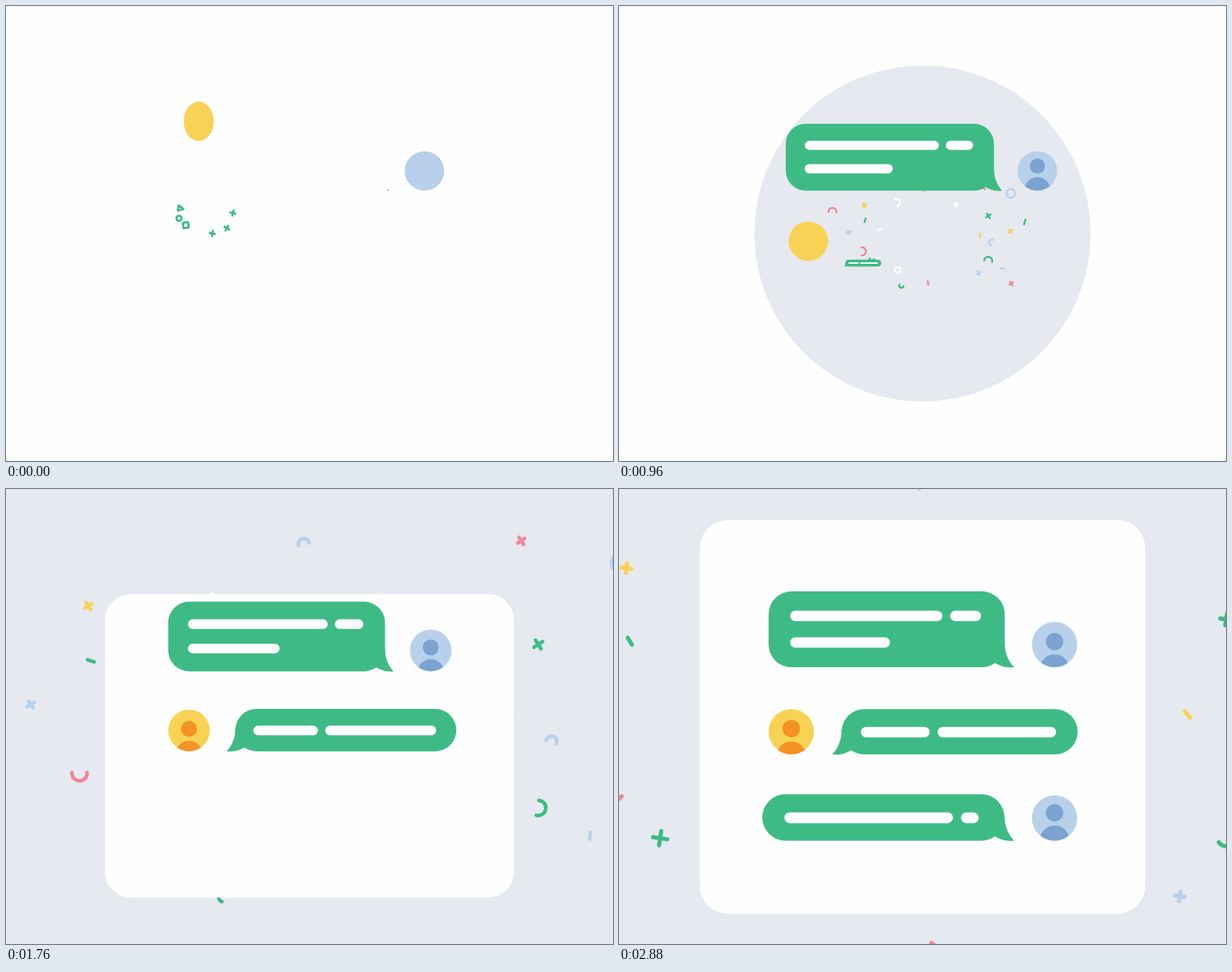
Write an HTML page with a canvas that moves like this. It is 800 by 600 pixels and loops after 2960 ms.

```html
<!DOCTYPE html>
<html lang="en">
<head>
<meta charset="utf-8">
<title>Chat bubbles</title>
<style>
  html, body { margin: 0; width: 100%; height: 100%; overflow: hidden; background: #fefefe; }
  canvas { display: block; width: 100vw; height: 100vh; }
</style>
</head>
<body>
<canvas id="stage" width="800" height="600"></canvas>
<script>
const ctx = document.getElementById('stage').getContext('2d');
const LOOP = 2960, STEP = 80, TAU = Math.PI * 2;
const WHITE = '#fefefe', GREY = '#e6e9f0', GREEN = '#3ebb84', YELLOW = '#f8d254',
      ORANGE = '#f39324', BLUE = '#b9d0eb', NAVY = '#7aa3d0', PINK = '#f2849e';

const clamp = (v, lo = 0, hi = 1) => Math.max(lo, Math.min(hi, v));
const mix = (a, b, u) => a + (b - a) * u;
const rad = deg => deg * Math.PI / 180;
const smooth = u => (1 - Math.cos(Math.PI * clamp(u))) / 2;
const settle = (d, tau) => 1 - Math.exp(-((Math.max(d, 0) / tau) ** 2));

// Quick growth that overshoots by about 5% and slowly sinks back.
const bubbleScale = d => settle(d, 188) * (1 + .053 * clamp(1 - (d - 320) / 880));

// Offset of the head from the middle of its disc: it rises from below, then sinks a little.
const headRise = d => mix(38, -7.2, settle(d, 477)) + 3.7 * smooth((d - 1040) / 860);

// Share of the flight done: a fast launch, then an even slowdown.
const flight = t => 1.11 * (1 - (1 - (t - 641) / 2237) ** 2) * settle(t - 800, 130);

function disc(x, y, r, fill) {
  ctx.beginPath();
  ctx.arc(x, y, r, 0, TAU);
  ctx.fillStyle = fill;
  ctx.fill();
}

function box(x, y, w, h, r, fill) {
  ctx.beginPath();
  ctx.roundRect(x, y, w, h, r);
  ctx.fillStyle = fill;
  ctx.fill();
}

function line(half) {
  ctx.moveTo(-half, 0);
  ctx.lineTo(half, 0);
}

function cross(half) {
  line(half);
  ctx.moveTo(0, -half);
  ctx.lineTo(0, half);
}

function ring(r) {
  ctx.arc(0, 0, r, 0, TAU);
}

function arc(r) {
  ctx.arc(0, 0, r, rad(-95), rad(95));
}

function triangle() {
  ctx.moveTo(-3, -3.5);
  ctx.lineTo(4, 0);
  ctx.lineTo(-3, 3.5);
  ctx.closePath();
}

function piece(color, x, y, angle, scale, width, trace) {
  if (scale <= 0) return;
  ctx.save();
  ctx.translate(x, y);
  ctx.rotate(rad(angle));
  ctx.scale(scale, scale);
  ctx.strokeStyle = color;
  ctx.lineWidth = width;
  ctx.lineCap = ctx.lineJoin = 'round';
  ctx.beginPath();
  trace();
  ctx.stroke();
  ctx.restore();
}

// Every piece flies straight from one origin through its point, growing and turning alike.
function confetti(t) {
  if (t <= 800) return;
  const f = flight(t);
  const fly = (shape, size, color, x, y, angle = -8) =>
    piece(color, mix(405, x, f), mix(304, y, f), angle + 150 * (f - 1), Math.sqrt(f), 5.2,
      () => shape(size));

  fly(cross, 9, GREEN, 89, 445);
  fly(cross, 7.5, GREEN, 761, 185);
  fly(cross, 6, YELLOW, 49, 124);
  fly(cross, 6, YELLOW, 889, 273);
  fly(cross, 6, PINK, 734, 21);
  fly(cross, 6, PINK, 893, 574);
  fly(cross, 6, BLUE, -42, 280);
  fly(cross, 6, BLUE, 706, 514);
  fly(cross, 6, WHITE, 575, 120);

  fly(line, 5, GREEN, 53, 211, 43);
  fly(line, 7, GREEN, 971, 220, 43);
  fly(line, 5, YELLOW, 715, 298, 35);
  fly(line, 5, BLUE, 843, 488, 123);
  fly(line, 5, PINK, 415, 572, 195);
  fly(line, 5, WHITE, 140, 263, 95);

  fly(arc, 11, PINK, -134, 162, 30);
  fly(arc, 11, PINK, 35, 389, 115);
  fly(arc, 11, GREEN, 761, 444, 35);
  fly(arc, 6, GREEN, 262, 586, 225);
  fly(arc, 8, BLUE, 782, 339, 315);
  fly(arc, 8, BLUE, 390, 26, -80);
  fly(arc, 10, WHITE, 234, 109, 100);

  fly(ring, 12, BLUE, 890, 56);
  fly(ring, 8, WHITE, 240, 497);
}

function burst(t) {
  if (t > 640) return;
  const u = t / 640, out = 1 + .6 * (1 - (1 - u) ** 2), size = clamp(1.04 - u ** 2);
  const put = (dx, dy, angle, trace) =>
    piece(GREEN, 254 + dx * out, 278 + dy * out, angle + 90 * u, size, 2.8, trace);
  put(-24, -11, 10, triangle);
  put(-26, 2, 0, () => ring(3.4));
  put(-17, 11, -10, () => ctx.rect(-3.5, -3.5, 7, 7));
  put(18, 22, 10, () => cross(3.5));
  put(37, 15, 30, () => cross(3.5));
  put(45, -5, 15, () => cross(3.5));
}

// The bubble grows from the tip of its tail; side -1 puts the body left of it.
// A row of text is a list of bar widths, set one after the other.
function bubble(tipX, tipY, side, scale, rows) {
  if (scale <= 0) return;
  const height = rows.length > 1 ? 87 : 52;
  ctx.save();
  ctx.translate(tipX, tipY);
  ctx.scale(-side * scale, scale);
  box(-281.5, -height, 270.8, height, 26, GREEN);
  ctx.beginPath();
  ctx.moveTo(-10.7, -29);
  ctx.bezierCurveTo(-10.7, -16, -6.5, -7, 0, 0);
  ctx.bezierCurveTo(-8, 1, -16, -1, -22, -5);
  ctx.lineTo(-26, -20);
  ctx.fill();
  rows.forEach((bars, i) => {
    let x = -256.8;
    const y = 22 - height + i * 30.5 - (rows.length > 1 ? 0 : 1.6);
    for (const w of bars) {
      box(x, y, w, 12, 6, WHITE);
      x += w + 9;
    }
  });
  ctx.restore();
}

function avatar(x, y, rx, ry, fill, dark, rise) {
  if (rx <= 0) return;
  ctx.save();
  ctx.beginPath();
  ctx.ellipse(x, y, rx, ry, 0, 0, TAU);
  ctx.fillStyle = fill;
  ctx.fill();
  ctx.clip();
  disc(x, y + rise, 10, dark);
  disc(x, y + rise + 31.7, 17, dark);
  ctx.restore();
}

// Thrown up, falls, bounces once and rests.
function ball(t) {
  const peak = 227, land = 854, rest = 1102, gravity = 4.85e-4;
  let y = 317.5;
  if (t < land) y = 127 + gravity * (t - peak) ** 2;
  else if (t < rest) y = 310 + gravity * (t - (land + rest) / 2) ** 2;
  const squeeze = clamp(Math.abs(t - peak) / 220) * clamp((land + 70 - t) / 70);
  avatar(mix(254, 249.5, clamp(t / 640)), y, 26 - 6.3 * squeeze, 26,
    YELLOW, ORANGE, headRise(t - 1060));
}

function draw(t) {
  ctx.fillStyle = WHITE;
  ctx.fillRect(0, 0, 800, 600);

  const d = t - 640;
  if (d >= 0) disc(400, 300, 12.5 + .45 * d + .000635 * d * d, GREY);
  confetti(t);

  const zoom = 1 + .149 * smooth((t - 1297) / 1114);
  ctx.save();
  ctx.translate(400, 300);
  ctx.scale(zoom, zoom);
  ctx.translate(-400, -300);

  if (t > 1125) {
    const h = 452.5 * (1 - (1 - (t - 1125) / 3125) ** 8);
    box(144.5, 526.2 - h, 511, h, Math.min(32, h / 2), WHITE);
  }

  burst(t);
  bubble(505, 243.5, -1, bubbleScale(t + 20), [[174.5, 35.5], [114.5]]);
  bubble(296.5, 343.5, 1, bubbleScale(t - 880), [[136, 79]]);
  bubble(505, 442.5, -1, bubbleScale(t - 2110), [[188.5, 19.8]]);

  avatar(551.5, 217.5, 26, 26, BLUE, NAVY, headRise(t));
  ball(t);
  const r = 26 * smooth((t - 1740) / 360);
  avatar(551.5, 416.6, r, r, BLUE, NAVY, headRise((t - 1760) * 1.2));
  ctx.restore();
}

const start = performance.now();
function tick() {
  const t = (performance.now() - start) % LOOP;
  draw(Math.floor(t / STEP) * STEP);
  requestAnimationFrame(tick);
}
tick();
</script>
</body>
</html>
```
